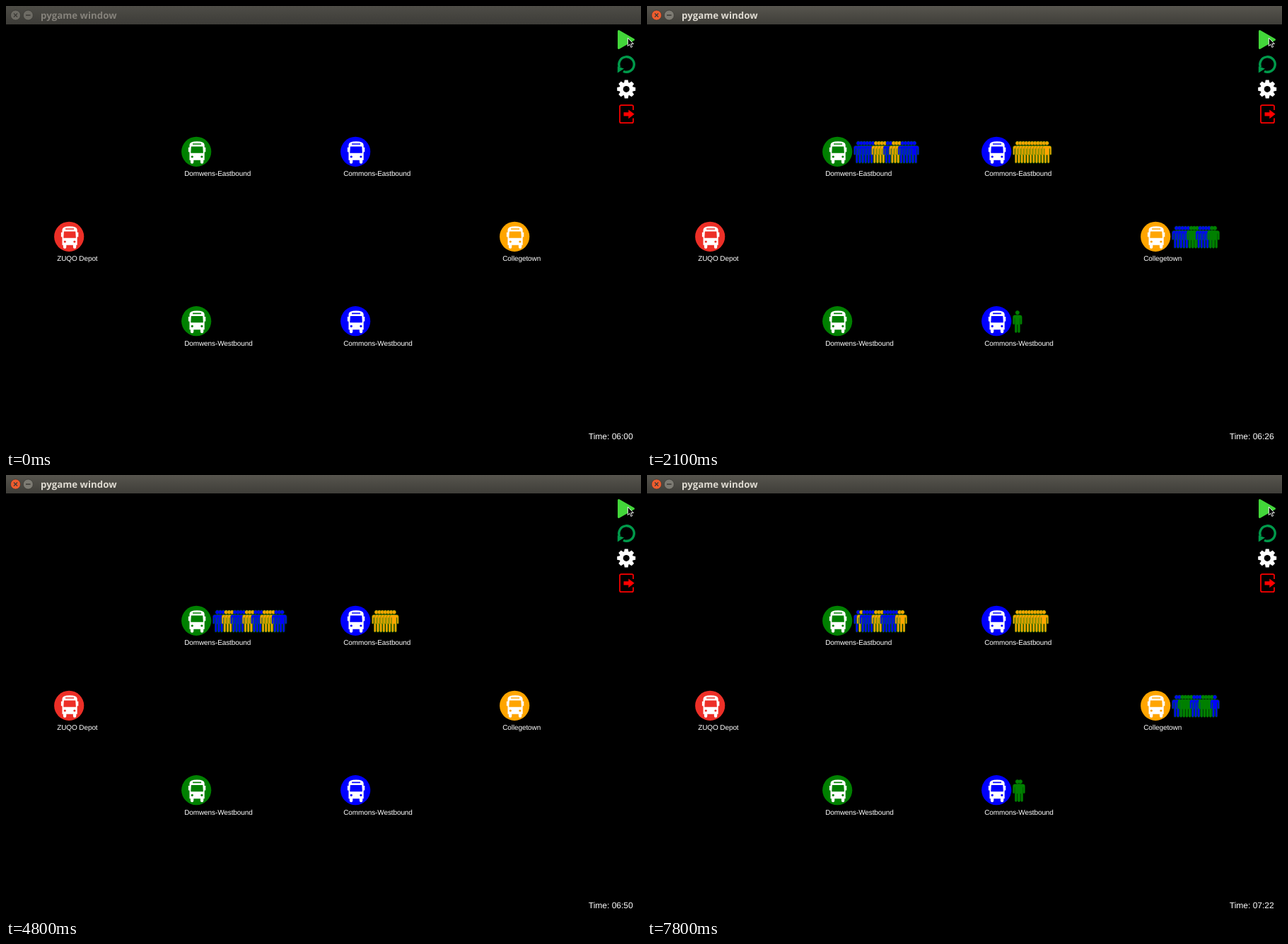
Write an HTML page that moves like this. It is 898 px wide and 623 px high and loops after 8 s.

```html
<!DOCTYPE html>
<html lang="en">
<head>
<meta charset="utf-8">
<title>pygame window</title>
<style>
  html, body { margin: 0; width: 100%; height: 100%; overflow: hidden; background: #000; }
  svg { display: block; width: 898px; height: 623px; }
  text { font-family: "Liberation Sans", Arial, sans-serif; fill: #fff; text-rendering: geometricPrecision; }
  .label { font-size: 10px; letter-spacing: -.01em; }
  #clock { font-size: 12px; }
  #title { font: bold 13.3px "Open Sans", "Noto Sans", sans-serif; }
</style>
</head>
<body>
<svg viewBox="0 0 898 623">
  <defs>
    <linearGradient id="active" x2="0" y2="1">
      <stop stop-color="#57554e"/><stop offset="1" stop-color="#3f3e39"/>
    </linearGradient>
    <linearGradient id="idle" x2="0" y2="1">
      <stop stop-color="#4e4d47"/><stop offset="1" stop-color="#3d3c38"/>
    </linearGradient>
    <path id="person" stroke="#008000" stroke-opacity=".7" stroke-width=".6" d="M6.65 0a2.8 2.8 0 1 0 .01 0z
      M3 6.4H10.3Q13 6.4 13 9V18.2a1.15 1.15 0 0 1-2.3 0V10.6h-.5V29.6a1.45 1.45 0 0 1-2.9 0V19.5h-1.25V29.6a1.45 1.45 0 0 1-2.9 0V10.6h-.5V18.2a1.15 1.15 0 0 1-2.3 0V9Q.4 6.4 3 6.4z"/>
    <path id="bus" fill="#fff" fill-rule="evenodd" d="M-10.6 11.6V0H-12.2V-6.5H-10.6V-10Q-10.4-15 0-15Q10.4-15 10.6-10V-6.5H12.2V0H10.6V11.6H9.2V14.4a1.8 1.8 0 0 1-4.4 0V11.6H-4.8V14.4a1.8 1.8 0 0 1-4.4 0V11.6z
      M-6-12V-10.4H6V-12z M-8.2-7.6L-8.8 1.6H8.8L8.2-7.6z
      M-6.8 5.2a1.6 1.6 0 1 0 .01 0z M6.8 5.2a1.6 1.6 0 1 0 .01 0z"/>
  </defs>
  <rect width="898" height="623"/>

  <rect id="bar" width="898" height="26"/>
  <g stroke="#33322e" stroke-opacity=".6">
    <circle id="close" cx="13.5" cy="13" r="7"/>
    <circle id="mini" cx="31.3" cy="13" r="7"/>
  </g>
  <path d="M11 10.5l5 5m0-5l-5 5M28 13h6.6" stroke="#3c3b37" stroke-width="1.3"/>
  <text id="title" x="49" y="18">pygame window</text>

  <path d="M866.5 35.5L887.5 47.5L866.5 59.5z" fill="#43d63a" stroke="#43d63a" stroke-width="3" stroke-linejoin="round"/>
  <path d="M879.3 45v11.6l2.6-2.4 1.9 4.2 1.9-.8-1.9-4.1h3.6z" stroke="#fff" stroke-width=".9"/>
  <path d="M867.6 86.5A10.7 10.7 0 1 1 873 92.2" fill="none" stroke="#00994a" stroke-width="3.4"/>
  <path d="M864.8 94.5V85.2L874 88.4z" fill="#00994a"/>
  <g id="gear" transform="translate(877.2 117.4)" fill="#fff"></g>
  <path d="M887 147V142Q887 140.2 885 140.2H870Q868 140.2 868 142V163.2Q868 165.2 870 165.2H885Q887 165.2 887 163.2V158.5" fill="none" stroke="#f00" stroke-width="1.7"/>
  <path d="M873.5 150.2H880.3V146.4L888.6 152.8L880.3 159.2V155.4H873.5z" fill="#f00"/>

  <g id="stops"></g>
  <text id="clock" x="823.8" y="612"></text>
</svg>
<script>
const LOOP = 8000, GAP = 4.17, STEP = 2;
const COLOR = { B: '#0000ff', O: '#ffa500', G: '#008000', R: '#ed2f27' };
const $ = id => document.getElementById(id);

// Pace of the simulation: real ms and simulated minutes after 06:00.
const PACE = [[0, 0], [100, 2], [1300, 14], [2100, 26], [2900, 30], [3900, 41],
  [4800, 50], [5800, 56], [7000, 74], [7400, 80], [7800, 82], [LOOP, 82]];

// Riders arrive at a steady rate (per minute) in groups that alternate between
// two destinations; each bus empties the stop and a new line begins.
// Lines map their first minute to the sizes of their groups.
const STOPS = [
  { name: 'ZUQO Depot', x: 89.2, y: 325.8, color: 'R' },
  { name: 'Domwens-Eastbound', x: 269.2, y: 205.8, color: 'G', to: 'BO', rate: 1.1,
    lines: { 2: '64235', 29: '3343343', 53: '', 65: '114352' } },
  { name: 'Commons-Eastbound', x: 494.2, y: 205.8, color: 'B', to: 'OO', rate: .6,
    lines: { 7: '99', 37: '9', 65: '99' } },
  { name: 'Collegetown', x: 719.2, y: 325.8, color: 'O', to: 'BG', rate: 1.3,
    lines: { 2: '0141', 15: '53423131', 50: '0412244', 69: '24341' } },
  { name: 'Domwens-Westbound', x: 269.2, y: 445.2, color: 'G' },
  { name: 'Commons-Westbound', x: 494.2, y: 445.2, color: 'B', to: 'GG', rate: .6,
    lines: { 5: '99', 24: '99', 35: '99', 50: '99', 78: '99' } }
];

// Simulated minute, advancing in steps within each stretch of the pace.
function minuteAt(t) {
  const i = PACE.findIndex(p => p[0] > t);
  const [t0, a] = PACE[i - 1], [t1, b] = PACE[i];
  return a + STEP * Math.floor((b - a) * (t - t0) / (t1 - t0) / STEP + 1e-6);
}

function riders(stop, minute) {
  const since = Object.keys(stop.lines).filter(m => m <= minute).pop();
  if (!since) return '';
  const line = [...stop.lines[since]].map((n, i) => stop.to[i % 2].repeat(n)).join('');
  const count = Math.floor(stop.rate * (minute - since));
  return [...line.slice(0, count)].map((c, i) =>
    `<use href="#person" x="${stop.x + 23 + i * GAP}" y="${stop.y - 14.8}" fill="${COLOR[c]}"/>`).join('');
}

function build() {
  let teeth = '<circle r="9.7"/>';
  for (let a = 0; a < 360; a += 45)
    teeth += `<path d="M-3.4-8L-2.4-13H2.4L3.4-8z" transform="rotate(${a})"/>`;
  $('gear').innerHTML = teeth + '<circle r="4.5" fill="#000"/>';
  $('stops').innerHTML = STOPS.map((s, i) => `
    <circle cx="${s.x}" cy="${s.y}" r="21.1" fill="${COLOR[s.color]}"/>
    <use href="#bus" x="${s.x + .9}" y="${s.y + .4}"/>
    <text class="label" x="${s.x - 17}" y="${Math.round(s.y + 34.4)}">${s.name}</text>
    <g id="queue${i}"></g>`).join('');
}

function draw(minute) {
  const focus = minute > 0;
  $('bar').setAttribute('fill', focus ? 'url(#active)' : 'url(#idle)');
  $('close').setAttribute('fill', focus ? '#ee5c2e' : '#6d6b64');
  $('mini').setAttribute('fill', focus ? '#7d7b73' : '#6d6b64');
  $('title').style.fill = focus ? '#dfdbd2' : '#85827b';
  const pad = n => String(n).padStart(2, '0');
  $('clock').textContent = `Time: ${pad(6 + Math.floor(minute / 60))}:${pad(minute % 60)}`;
  STOPS.forEach((s, i) => { if (s.lines) $('queue' + i).innerHTML = riders(s, minute); });
}

let shown = -1;
const start = performance.now();
function frame() {
  const minute = minuteAt((performance.now() - start) % LOOP);
  if (minute !== shown) draw(shown = minute);
  requestAnimationFrame(frame);
}
build();
frame();
</script>
</body>
</html>
```
